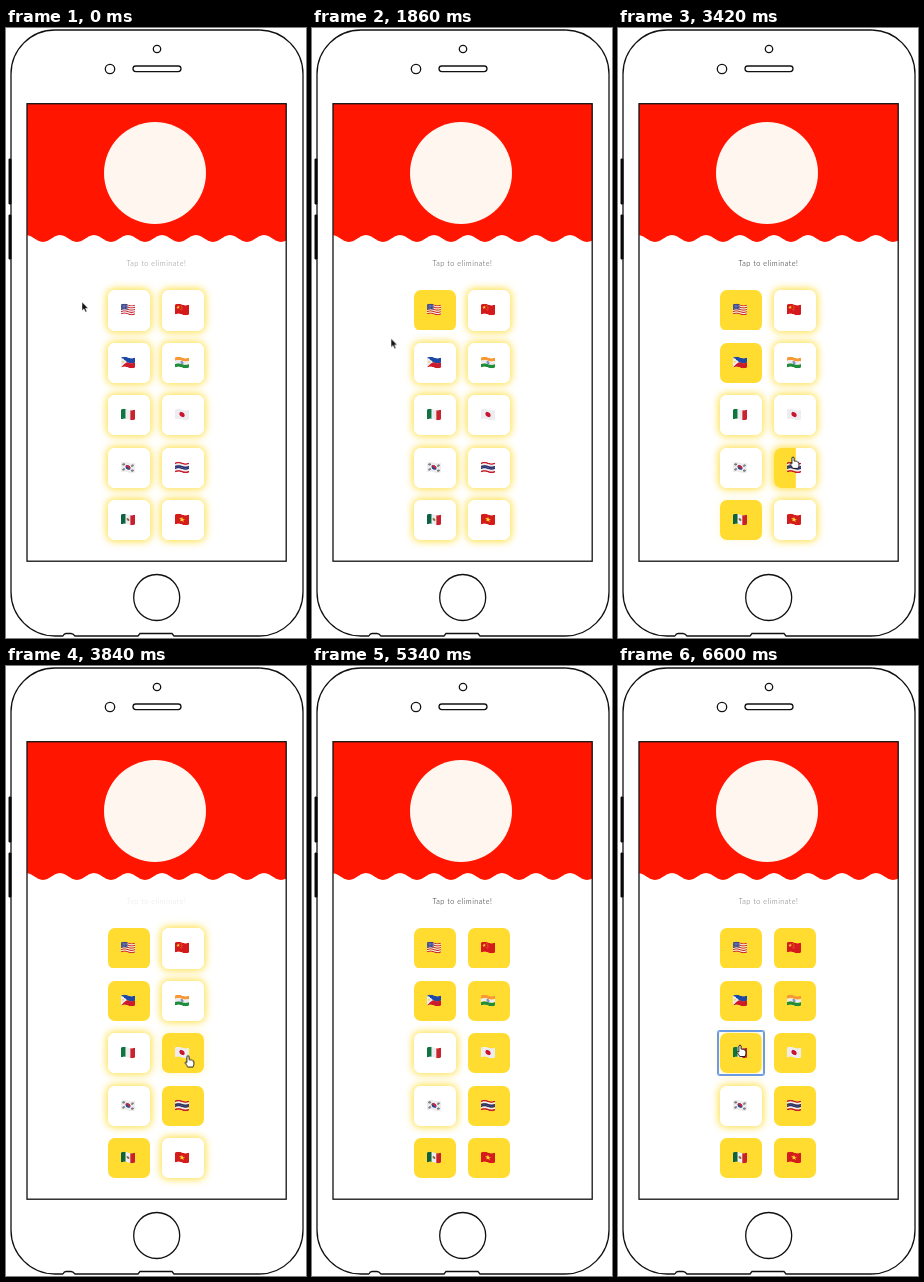
Animation of 300x610 px, one loop 6.63 s. Source, as an HTML page:

```html
<!DOCTYPE html>
<html lang="en">
<head>
<meta charset="utf-8">
<title>Tap to eliminate</title>
<style>
  html, body { margin: 0; width: 100%; height: 100%; overflow: hidden; background: #fff; }
  #stage { position: absolute; left: 0; top: 0; width: 300px; height: 610px; overflow: hidden; }
  #stage > svg { position: absolute; left: 0; top: 0; }
  .line { fill: none; stroke: #111; stroke-width: 1.3; }
  #hint { font: 300 7.3px Lato, sans-serif; letter-spacing: .48px; fill: #111; text-anchor: middle; }
  .card { position: absolute; width: 42px; height: 40.3px; }
  .card > * { position: absolute; inset: 0; border-radius: 7px; }
  .glow { box-shadow: 0 0 7px 2px rgba(255, 222, 60, .85); }
  .face { background: #fff; overflow: hidden; }
  .fill { width: 100%; height: 100%; background: #ffdc2f; transform: scaleX(0); transform-origin: left; }
  .focus { inset: -2px !important; border-radius: 2px !important; box-shadow: 0 0 0 1px #6c9be6, inset 0 0 0 1px #6c9be6; opacity: 0; }
  .card > svg { inset: auto; left: 13px; top: 14px; border-radius: 0; overflow: visible; }
  #cursor { overflow: visible; }
</style>
</head>
<body>
<div id="stage">
  <svg width="300" height="610">
    <path class="line" d="M57 608H49A44 44 0 0 1 5 564V46A44 44 0 0 1 49 2H253A44 44 0 0 1 297 46V564A44 44 0 0 1 253 608H168L166 605.5H134L132 608H69Q67 605.5 65 605.5H60Q58 605.5 57 608"/>
    <path d="M5 131H3V176H5ZM5 187H3V231H5Z" stroke="#111"/>
    <circle class="line" cx="151" cy="21" r="3.7"/>
    <circle class="line" cx="104" cy="41" r="4.7"/>
    <rect class="line" x="127" y="38" width="48" height="5.6" rx="2.8"/>
    <circle class="line" cx="150.7" cy="569.5" r="23"/>
    <path id="header" fill="#ff1500"/>
    <circle cx="149" cy="145" r="51" fill="#fff6f0"/>
    <rect class="line" x="21" y="75.7" width="259.2" height="457.5"/>
    <text id="hint" x="150.4" y="237.7">Tap to eliminate!</text>
  </svg>
  <div id="cards"></div>
  <svg id="cursor" width="12" height="14">
    <path id="arrow" d="M0 0V8.6L2 6.8 3.4 10 4.8 9.4 3.4 6.3H6Z" fill="#111" stroke="#fff" stroke-width=".4"/>
    <path id="hand" d="M-1.1.8Q0-.8 1.1.8V4.2Q2.2 3.5 2.8 4.5 3.9 4 4.4 5 5.6 4.7 5.9 6V8.5Q5.8 9.8 5 11.5H-.2Q-1.3 9.4-3 7.3-3.1 5.9-1.1 7Z" fill="#fff" stroke="#111" stroke-width=".9" stroke-linejoin="round"/>
  </svg>
</div>
<script>
const LOOP = 6630, FILL = 300;
const $ = id => document.getElementById(id);

// frames: [time, styles], held to the end of the loop
function track(el, frames) {
  const keys = frames.map(([t, style]) => ({ offset: t / LOOP, ...style }));
  if (keys[keys.length - 1].offset < 1) keys.push({ ...keys[keys.length - 1], offset: 1 });
  el.animate(keys, { duration: LOOP, iterations: Infinity });
}

// scalloped lower edge of the header
let edge = 'M21 76H280.2';
for (let x = 280.2; x >= 21; x -= .5)
  edge += `L${x.toFixed(1)} ${(210.5 - 3.4 * Math.cos((x - 20) * Math.PI / 17)).toFixed(2)}`;
$('header').setAttribute('d', edge + 'L21 76Z');

// flag pieces on a 14 x 11 field
const box = (x, y, w, h, c) => `<rect x="${x}" y="${y}" width="${w}" height="${h}" fill="${c}"/>`;
const dot = (x, y, r, c) => `<circle cx="${x}" cy="${y}" r="${r}" fill="${c}"/>`;
const rows = (...cs) => cs.map((c, i) => box(0, i * 11 / cs.length, 14, 11 / cs.length + .05, c)).join('');
const cols = (...cs) => cs.map((c, i) => box(i * 14 / cs.length, 0, 14 / cs.length + .05, 11, c)).join('');
function star(x, y, r, c) {
  const pts = Array.from({ length: 10 }, (_, i) => {
    const a = i * Math.PI / 5, d = i % 2 ? r * .4 : r;
    return [x + d * Math.sin(a), y - d * Math.cos(a)].map(v => v.toFixed(2));
  });
  return `<polygon points="${pts.join(' ')}" fill="${c}"/>`;
}
const bars = (x, y, a) => `<g transform="translate(${x} ${y}) rotate(${a})">` +
  [-.9, 0, .9].map(d => box(-1.1, d - .25, 2.2, .5, '#222')).join('') + '</g>';

// ripple a flat flag by shifting one-pixel columns
const ripple = flag => Array.from({ length: 14 }, (_, x) => {
  const y = .5 - .7 * Math.sin((x + .5) * Math.PI / 7);
  return `<svg x="${x}" y="${y.toFixed(2)}" width="1" height="10" viewBox="${x} 0 1 11" preserveAspectRatio="none">${flag}</svg>`;
}).join('');

const R = '#cf2a35', W = '#ededf0', Y = '#ffdf2e';
let dots = '';
for (let i = 0; i < 12; i++) dots += dot(1 + i % 4 * 1.4, 1.6 + (i / 4 | 0) * 1.5, .3, W);

const usa = rows(R, W, R, W, R, W, R, W, R) + box(0, 0, 6.4, 6, '#3d4c8f') + dots;
const china = rows('#d41a1c') + star(3.2, 3.8, 2, Y) +
  [[6, 1.8], [7, 3.2], [7, 4.9], [6, 6.2]].map(p => dot(...p, .45, Y)).join('');
const philippines = rows('#1c48a8', '#cc1b2b') + `<path d="M0 0L6 5.5 0 11Z" fill="${W}"/>` + dot(2, 5.5, .9, '#f5c52c');
const india = rows('#f79a35', W, '#1f8d3a') + dot(7, 5.5, 1.3, '#31429a') + dot(7, 5.5, .7, '#dfe2ef');
const italy = cols('#0f7440', W, '#c8242f');
const japan = rows(W) + dot(7, 5.5, 2.6, '#cb1430');
const korea = rows(W) + dot(7, 5.5, 2.4, '#2b4a95') +
  '<path d="M4.6 5.5A2.4 2.4 0 0 1 9.4 5.5Q8.2 6.9 7 5.5T4.6 5.5Z" fill="#cc2638"/>' +
  bars(2.6, 2.7, -52) + bars(11.4, 2.7, 52) + bars(2.6, 8.3, 52) + bars(11.4, 8.3, -52);
const thailand = rows('#c8202f', W, '#2c3272', '#2c3272', W, '#c8202f');
const mexico = cols('#0c6242', W, '#c8202f') + dot(7, 5.5, 1.4, '#8a6a3a');
const vietnam = rows('#d41c1c') + star(7, 5.6, 3, Y);

// flag and moment of its tap, left to right, top to bottom
const cards = [
  [usa, 590], [china, 4170],
  [philippines, 2478], [india, 3960],
  [italy, 6380], [japan, 3525],
  [korea, null], [thailand, 3330],
  [mexico, 3090], [vietnam, 4626],
];

cards.forEach(([flag, tap], i) => {
  const card = document.createElement('div');
  card.className = 'card';
  card.style.left = (i % 2 ? 156 : 102) + 'px';
  card.style.top = 262.3 + (i >> 1) * 52.4 + 'px';
  card.innerHTML = `<div class="glow"></div><div class="face"><div class="fill"></div></div>
    <svg width="14" height="11">${ripple(flag)}</svg><div class="focus"></div>`;
  $('cards').append(card);
  if (tap === null) return;

  const [glow, fill, focus] = ['glow', 'fill', 'focus'].map(c => card.querySelector('.' + c));
  track(fill, [
    [0, { transform: 'scaleX(0)' }],
    [tap, { transform: 'scaleX(0)', easing: 'ease' }],
    [Math.min(tap + FILL, LOOP), { transform: 'scaleX(1)' }],
  ]);
  track(glow, [
    [0, { opacity: 1 }],
    [tap + FILL * .55, { opacity: 1 }],
    [Math.min(tap + FILL * 1.2, LOOP), { opacity: 0 }],
  ]);
  if (flag === italy) track(focus, [[0, { opacity: 0, easing: 'step-end' }], [tap, { opacity: 1 }]]);
});

// breathing hint
track($('hint'), [
  [0, .5], [430, .04], [750, .38], [1320, 1], [1680, 1], [2250, .03], [2640, .28],
  [3120, 1], [3480, 1], [3840, .11], [4050, .03], [4650, .75], [5000, 1], [5280, 1],
  [5850, .03], [6600, .6],
].map(([t, opacity]) => [t, { opacity, easing: 'ease-in-out' }]));

// pointer path: time, x, y, shape (a arrow, h hand, - hidden)
const path = [
  [0, 76, 274, 'a'], [420, 102, 279, 'h'], [580, 117, 281, 'h'], [1000, 117, 282, 'h'],
  [1160, 102, 286, 'a'], [1320, 84, 290, 'a'], [1680, 84, 290, 'a'], [1900, 78, 315, 'a'],
  [2200, 84, 328, 'a'], [2400, 102, 334, 'h'], [2480, 116, 335, 'h'], [2720, 116, 335, 'h'],
  [3060, 119, 482, 'h'], [3150, 124, 488, 'h'], [3320, 166, 443, 'h'], [3400, 174, 436, 'h'],
  [3520, 180, 395, 'h'], [3840, 182, 390, 'h'], [3950, 180, 340, 'h'], [4160, 185, 288, 'h'],
  [4260, 200, 310, 'a'], [4460, 206, 440, 'a'], [4590, 197, 498, 'h'], [4650, 195, 501, 'h'],
  [5000, 193, 508, 'h'], [5090, 190, 514, 'a'], [5220, 190, 514, '-'], [5800, 77, 405, '-'],
  [5850, 77, 402, 'a'], [6180, 102, 388, 'h'], [6360, 121, 380, 'h'], [6600, 122, 379, 'h'],
];
const shown = shape => path.map(p => [p[0], { opacity: p[3] === shape ? 1 : 0, easing: 'step-end' }]);
track($('cursor'), path.map(([t, x, y]) => [t, { transform: `translate(${x}px, ${y}px)` }]));
track($('arrow'), shown('a'));
track($('hand'), shown('h'));
</script>
</body>
</html>
```
